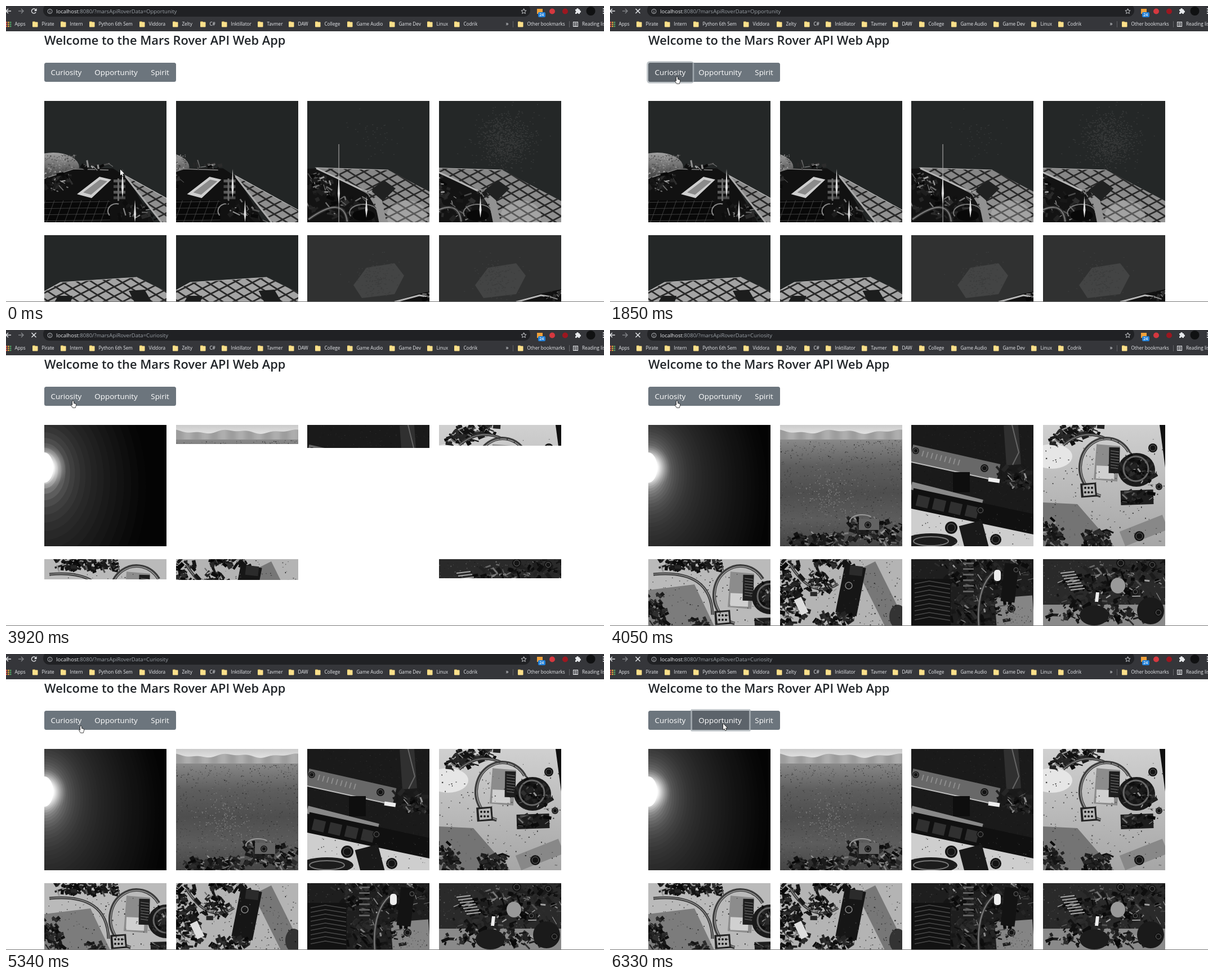
Write an HTML page with a canvas that moves like this. It is 1062 px wide and 527 px high and loops after 8000 ms.

```html
<!DOCTYPE html>
<html lang="en">
<head>
<meta charset="utf-8">
<title>Mars Rover API Web App</title>
<style>
html, body { margin: 0; width: 100%; height: 100%; overflow: hidden; background: #fff; }
canvas { display: block; width: 100vw; height: 100vh; }
</style>
</head>
<body>
<canvas id="stage" width="1062" height="527"></canvas>
<script>
const W = 1062, H = 527, LOOP = 8000, STEP = 120;
const FONT = '"Open Sans", "Noto Sans", sans-serif';
const LIGHT = '#e8eaed';
const stage = document.getElementById('stage').getContext('2d');
let c = stage;
let seed = 1;

const rnd = () => (seed = (seed * 16807) % 2147483647) / 2147483647;
const span = (a, b) => a + (b - a) * rnd();
const mix = (a, b, k) => a + (b - a) * k;
const grey = v => `rgb(${v | 0},${v | 0},${v | 0})`;
const times = (n, fn) => { for (let i = 0; i < n; i++) fn(i); };

function trace(pts) {
  c.beginPath();
  for (let i = 0; i < pts.length; i += 2) c.lineTo(pts[i], pts[i + 1]);
}
function poly(color, ...pts) { trace(pts); c.closePath(); c.fillStyle = color; c.fill(); }
function line(color, width, ...pts) { trace(pts); c.strokeStyle = color; c.lineWidth = width; c.stroke(); }
function rect(color, x, y, w, h) { c.fillStyle = color; c.fillRect(x, y, w, h); }
function oval(color, x, y, rx, ry = rx) {
  c.beginPath(); c.ellipse(x, y, rx, ry, 0, 0, 7); c.fillStyle = color; c.fill();
}
function ring(color, width, x, y, rx, ry = rx, from = 0, to = 6.3) {
  c.beginPath(); c.ellipse(x, y, rx, ry, 0, from, to);
  c.strokeStyle = color; c.lineWidth = width; c.stroke();
}
function pill(color, x, y, w, h, r) {
  c.beginPath(); c.roundRect(x, y, w, h, r); c.fillStyle = color; c.fill();
}
function text(s, x, y, size, color, weight = 400) {
  c.font = `${weight} ${size}px ${FONT}`;
  c.fillStyle = color;
  c.fillText(s, x, y);
}
function fade(y0, y1, ...stops) {
  const g = c.createLinearGradient(0, y0, 0, y1);
  stops.forEach((s, i) => g.addColorStop(i / (stops.length - 1), s));
  return g;
}

// ---- Photo textures

function specks(n, x, y, w, h, lo, hi, size = 1.6) {
  times(n, () => rect(grey(span(lo, hi)), x + rnd() * w, y + rnd() * h, span(.6, size), span(.6, size)));
}
function haze(n, x, y, spread, tone) {
  times(n, () => {
    const r = spread * Math.sqrt(-2 * Math.log(rnd())), a = rnd() * 6.283;
    rect(tone, x + r * Math.cos(a), y + r * Math.sin(a), 2, 1.4);
  });
}
// Dark machine parts strewn along a line, with a few lit edges
function swarm(n, x0, y0, x1, y1, spread, lit = .25) {
  times(n, () => {
    const k = rnd(), w = span(3, 15), h = span(2, 8), bright = rnd() < lit;
    c.save();
    c.translate(mix(x0, x1, k) + span(-spread, spread), mix(y0, y1, k) + span(-spread, spread));
    c.rotate(span(-1, 1.4));
    rect(grey(bright ? span(70, 165) : span(8, 48)), -w / 2, -h / 2, w, bright ? h * .4 : h);
    c.restore();
  });
}
function bolt(x, y, r) {
  oval('#141414', x, y, r);
  ring('#666', 1, x, y, r * .65);
}
function cable(x0, y0, cx, cy, x1, y1) {
  c.beginPath(); c.moveTo(x0, y0); c.quadraticCurveTo(cx, cy, x1, y1);
  c.strokeStyle = '#3c3c3c'; c.lineWidth = 5; c.stroke();
  c.strokeStyle = '#999'; c.lineWidth = 1.2; c.stroke();
}
function lattice(...pts) {
  c.save();
  trace(pts); c.closePath(); c.clip();
  rect(fade(285, 500, '#848484', '#a4a4a4'), 0, 160, W, H);
  for (const slope of [.65, -.5])
    for (let k = -900; k < 1400; k += 17) line('#2a2a2a', 2.8, 0, k, W, k + slope * W);
  c.restore();
  line('#bbb', 1.2, ...pts.slice(0, 6));
}
function spike(x, top, bottom) {
  const mid = mix(top, bottom, .65);
  poly('#ddd', x, top, x + 2, mid, x, bottom, x - 2, mid);
}

function photo(col, row, h, back, draw, dx = 0, dy = 0) {
  seed = 41 + col * 7 + row * 101;
  c.save();
  c.beginPath(); c.rect(Math.round(68 + 233.67 * col), row ? 408 : 169, 217, h); c.clip();
  c.fillStyle = back; c.fillRect(0, 0, W, H);
  c.translate(dx, dy);
  draw();
  c.restore();
}

// ---- First gallery

function deck() {
  oval(fade(260, 300, '#a4a4a4', '#4c4c4c'), 84, 287, 46, 26);
  specks(170, 68, 264, 55, 36, 60, 170, 3);
  poly('#111', 40, 316, 120, 289, 190, 289, 216, 306, 262, 385, 40, 385);
  line('#8a8a8a', 1.6, 50, 313, 120, 290, 182, 292);
  swarm(16, 140, 285, 188, 287, 4, .5);
  swarm(34, 72, 325, 110, 310, 13, .3);
  poly('#cfcfcf', 126, 335, 166, 304, 187, 309, 152, 342);
  poly('#8b8b8b', 137, 332, 167, 309, 180, 312, 151, 336);
  times(4, i => rect(grey(90 - 20 * (i % 2)), 191, 309 + i * 10, 21, 5));
  rect('#6a6a6a', 198, 307, 3, 40);
  rect('#080808', 40, 346, 145, 39);
  times(8, i => line('#4c4c4c', .8, 70 + i * 16, 346, 56 + i * 16, 385));
  times(4, i => line('#4c4c4c', .8, 40, 350 + i * 11, 185, 348 + i * 11));
  ring('#8b8b8b', 2, 196, 365, 15, 13, 2.5, 5);
  swarm(38, 205, 360, 255, 372, 14, .3);
  lattice(277, 385, 212, 302, 330, 367, 340, 385);
  line('#aaa', 3, 212, 303, 276, 385);
  spike(207, 290, 342);
  spike(229, 345, 385);
}

function mast() {
  poly('#131313', 500, 291, 553, 289, 650, 334, 668, 385, 500, 385);
  swarm(55, 540, 305, 570, 325, 14, .35);
  swarm(70, 550, 345, 640, 365, 22, .2);
  cable(537, 380, 600, 335, 606, 384);
  ring('#777', 2, 635, 368, 25, 15, 2.7, 6.3);
  oval('#080808', 635, 373, 20, 10);
  lattice(641, 333, 551, 288, 679, 292, 800, 356, 800, 385, 672, 385);
  oval('rgba(205,205,205,.3)', 712, 374, 36, 28);
  line('#b4b4b4', 3, 551, 289, 643, 332);
  line('#929292', 13, 660, 340, 670, 390);
  poly('#202121', 647, 328, 671, 310, 692, 325, 669, 347);
  swarm(9, 632, 327, 648, 333, 3, .8);
  spike(640, 338, 377);
}

function roof() {
  lattice(20, 535, 97, 492, 233, 483, 310, 521, 310, 540);
  poly('#1c1d1d', 93, 516, 118, 516, 115, 527, 86, 527);
  poly('#1c1d1d', 218, 507, 246, 505, 259, 527, 228, 527);
}

function glare() {
  poly('#434444', 617, 497, 640, 466, 690, 458, 707, 480, 690, 513, 632, 520);
  haze(160, 655, 485, 17, '#3c3d3d');
  poly('#111', 686, 527, 730, 513, 790, 500, 790, 527);
  line('#b5b5b5', 3, 690, 527, 734, 515, 752, 518);
  swarm(18, 745, 520, 775, 514, 6, .4);
}

function firstGallery() {
  const sky = '#242727';
  photo(0, 0, 216, sky, deck);
  photo(1, 0, 216, '#222525', deck, 195.5);
  photo(2, 0, 216, sky, () => {
    haze(50, 650, 228, 23, '#353838');
    mast();
    rect('#a4a4a4', 590.5, 246, 1.2, 139);
    spike(591, 300, 352);
  });
  photo(3, 0, 216, sky, () => { haze(900, 684, 239, 23, '#383a3a'); mast(); }, 202.5);
  photo(0, 1, 118, sky, roof);
  photo(1, 1, 118, '#222525', roof, 230.5);
  photo(2, 1, 118, '#303131', glare);
  photo(3, 1, 118, '#303131', glare, 216);
}

// ---- Second gallery

function sun(bands, reach) {
  times(bands, i => {
    const k = i / bands, r = reach * Math.pow(1 - k, 1.4) + 16;
    oval(grey(6 + 70 * k + 170 * Math.pow(k, 6)), 68, 245 + r * .19, r, r * 1.35);
  });
  const g = c.createRadialGradient(68, 245, 16, 68, 245, 40);
  g.addColorStop(0, '#fff'); g.addColorStop(1, 'rgba(150,150,150,0)');
  oval(g, 68, 245, 40);
  oval('#fff', 68, 245, 16, 27);
}

function horizon() {
  rect(fade(169, 184, '#cacaca', '#e0e0e0'), 301, 169, 218, 20);
  for (let x = 301; x < 519; x++) {
    const ridge = 181 + 2.5 * Math.sin(x / 17) + 1.5 * Math.sin(x / 7);
    rect(grey(166 + 9 * Math.sin(x / 5)), x, ridge, 1.2, 22);
  }
  rect(fade(194, 385, '#8a8a8a', '#5e5e5e', '#4e4e4e', '#5c5c5c', '#444'), 301, 195, 218, 190);
  specks(1100, 301, 196, 218, 189, 45, 112, 2);
  haze(160, 388, 292, 25, '#787878');
  swarm(150, 325, 378, 415, 374, 12, .28);
  swarm(150, 435, 352, 510, 365, 20, .28);
  line('#636363', 20, 442, 346, 478, 346);
  ring('#999', 2, 448, 341, 22, 12, 3, 5.5);
  bolt(458, 347, 6);
}

function arm() {
  specks(650, 535, 169, 217, 166, 18, 52);
  line('#303030', 26, 712, 169, 717, 240);
  line('#666', 2, 714, 169, 726, 218, 715, 240);
  line('#686868', 31, 535, 219, 690, 254);
  times(9, i => line('#8e8e8e', 2, 557 + i * 8, 215 + i * 2, 554 + i * 8, 225 + i * 2));
  line('#bdbdbd', 2, 535, 235, 686, 268);
  bolt(543, 215, 6); bolt(665, 246, 7);
  swarm(70, 700, 262, 745, 270, 19, .12);
  line('#eee', 7, 672, 266, 692, 269);
  rect('#0e0e0e', 609, 253, 30, 36);
  line('#888', 14, 535, 277, 661, 309);
  line('#101010', 40, 535, 301, 752, 348);
  times(4, i => line('#303030', 20, 545 + i * 29, 303 + i * 6, 566 + i * 29, 308 + i * 6));
  poly('#cecece', 535, 318, 752, 364, 752, 385, 535, 385);
  line('#191919', 42, 640, 344, 652, 390);
  oval('#1c1c1c', 570, 376, 47, 14);
  ring('#777', 2, 570, 376, 31, 8);
  bolt(606, 352, 11); bolt(685, 373, 10); bolt(658, 321, 7);
  specks(55, 542, 324, 206, 58, 25, 90, 2);
}

// Cable loop, sensor frame and hub seen from two viewpoints
function instruments() {
  ring('#3c3c3c', 6, 882, 245, 47, 52, 1.8, 5.7);
  ring('#999', 1.5, 882, 245, 46, 51, 1.8, 5.7);
  line('#8c8c8c', 42, 885, 205, 880, 268);
  line('#d0d0d0', 32, 880, 242, 879, 265);
  line('#1e1e1e', 19, 896, 209, 895, 255);
  times(7, i => line('#777', 1, 889, 215 + i * 5, 904, 217 + i * 5));
  oval('#1a1a1a', 935, 249, 33, 30);
  swarm(60, 920, 240, 960, 262, 18, .2);
  ring('#666', 3, 934, 247, 22);
  line('#1e1e1e', 26, 907, 299, 965, 297);
  swarm(28, 913, 299, 960, 297, 10, .3);
  line('#222', 25, 836, 286, 864, 284);
  line('#b4b4b4', 19, 840, 286, 861, 284);
  times(6, i => oval('#111', 844 + (i % 3) * 6, 281 + (i / 3 | 0) * 8, 1.9));
}

function mainDeck() {
  oval('#e6e6e6', 785, 225, 36, 22);
  poly('#747474', 769, 307, 830, 310, 895, 385, 769, 385);
  line('#888', 28, 910, 372, 986, 342);
  swarm(110, 795, 193, 862, 174, 14, .25);
  cable(805, 205, 840, 175, 880, 193);
  instruments();
  swarm(80, 778, 350, 795, 382, 16, .08);
  swarm(80, 850, 374, 878, 372, 15, .08);
  poly('#101010', 976, 169, 986, 169, 986, 245);
  bolt(964, 210, 8); bolt(975, 279, 6); bolt(940, 367, 9);
  specks(170, 769, 190, 217, 192, 15, 100, 2.4);
}

function sideDeck() {
  poly('#7c7c7c', 718, 236, 800, 226, 835, 300, 718, 300);
  swarm(120, 745, 190, 845, 190, 12, .25);
  cable(727, 208, 830, 198, 832, 280);
  instruments();
  swarm(80, 726, 255, 742, 295, 15, .08);
  swarm(30, 800, 295, 825, 296, 9, .1);
  specks(120, 718, 207, 217, 92, 15, 100, 2.4);
}

function boxDeck() {
  line('#777', 36, 455, 420, 512, 535);
  swarm(190, 308, 415, 328, 525, 24, .2);
  line('#ddd', 14, 333, 478, 346, 505);
  cable(320, 418, 360, 482, 405, 452);
  swarm(60, 350, 440, 392, 460, 18, .35);
  swarm(50, 370, 412, 430, 413, 8, .35);
  line('#161616', 38, 436, 420, 419, 506);
  line('#2b2b2b', 23, 438, 420, 436, 437);
  ring('#888', 1.5, 424, 455, 6);
  swarm(60, 372, 517, 425, 517, 12, .12);
  oval('#333', 511, 510, 15, 21);
  specks(140, 360, 409, 158, 117, 15, 100, 2.4);
}

function driveDeck() {
  specks(300, 535, 408, 217, 119, 15, 80, 2);
  line('#858585', 55, 685, 505, 752, 500);
  swarm(210, 590, 430, 735, 440, 28, .2);
  swarm(130, 615, 500, 690, 495, 25, .15);
  rect('#121212', 535, 443, 70, 84);
  times(9, i => line('#484848', 1.4, 541, 452 + i * 8, 567, 447 + i * 8, 604, 453 + i * 8));
  times(6, i => rect('#606060', 627, 414 + i * 10, 19, 3));
  cable(655, 527, 650, 460, 681, 431);
  pill('#eee', 682, 427, 12, 20, 5);
  line('#131313', 25, 714, 416, 706, 484);
  bolt(721, 427, 6); bolt(713, 496, 7);
  specks(60, 686, 487, 64, 39, 20, 150, 2.2);
}

function wheelDeck() {
  specks(390, 769, 408, 217, 119, 25, 120, 2);
  rect('#8a8a8a', 769, 489, 217, 38);
  swarm(260, 812, 465, 975, 440, 33, .22);
  swarm(120, 790, 505, 970, 505, 15, .15);
  times(7, i => line('#aaa', 1.8, 800 + i * 3, 433 + i * 5, 825 + i * 3, 430 + i * 5));
  oval('#1c1c1c', 860, 508, 26, 18);
  oval('#1a1a1a', 960, 500, 24, 24);
  oval('#999', 902, 455, 13, 14);
  bolt(907, 415, 8); bolt(963, 418, 7); bolt(933, 466, 6); bolt(974, 503, 7);
  line('#eee', 6, 866, 467, 864, 484);
}

function secondGallery(loaded) {
  const h = part => loaded ? 216 : part, low = part => loaded ? 118 : part;
  const floor = fade(169, 385, '#d0d0d0', '#a6a6a6');
  photo(0, 0, 216, '#040404', () => sun(loaded ? 38 : 17, loaded ? 195 : 165));
  photo(1, 0, h(34), '#666', horizon);
  photo(2, 0, h(41), '#1a1a1a', arm);
  photo(3, 0, h(37), floor, mainDeck);
  photo(0, 1, low(36), '#bababa', sideDeck, -650, 227);
  photo(1, 1, low(37), '#b4b4b4', boxDeck);
  if (loaded) photo(2, 1, 118, '#1e1e1e', driveDeck);
  photo(3, 1, low(34), '#2a2a2a', wheelDeck);
}

function prerender(draw) {
  const layer = document.createElement('canvas');
  layer.width = W; layer.height = H;
  c = layer.getContext('2d');
  draw();
  c = stage;
  return layer;
}

// ---- Browser window

const bookmarks = {
  Pirate: 47, Intern: 97, 'Python 6th Sem': 148, Viddora: 237, Zelty: 296, 'C#': 345,
  Inktillator: 383, Tavmer: 447, DAW: 502, College: 549, 'Game Audio': 606,
  'Game Dev': 681, Linux: 748, Codrik: 796, 'Other bookmarks': 909
};

function bookmark(name, x) {
  pill('#e8c35f', x, 27.5, 5, 4, 1);
  pill('#fce08b', x, 28.5, 9.5, 9, 1);
  text(name, x + 16.4, 35.2, 8.2, LIGHT);
}

function star(x, y, r) {
  const pts = [];
  times(12, i => {
    const a = i * Math.PI / 5 - Math.PI / 2, d = i % 2 ? r * .46 : r;
    pts.push(x + d * Math.cos(a), y + d * Math.sin(a));
  });
  line('#c8cacd', 1, ...pts);
}

function arrow(color, tip, tail) {
  const back = tip + Math.sign(tail - tip) * 4;
  line(color, 1.4, tail, 9, tip, 9);
  line(color, 1.4, back, 5, tip, 9, back, 13);
}

function toolbar() {
  rect('#35363a', 0, 0, W, 45);
  pill('#202124', 66, -4, 865, 23, 11);
  arrow(LIGHT, 0, 9);
  arrow('#85878b', 31, 22);
  ring('#b5b8bc', 1, 78, 9.5, 4);
  rect('#b5b8bc', 77.5, 9, 1, 3); rect('#b5b8bc', 77.5, 7, 1, 1);
  star(919.5, 9.6, 4.8);
  rect('#f0a13a', 943, 5, 10, 9);
  pill('#2381d8', 945, 11, 13, 9, 2);
  text('24', 947.3, 18, 7, '#fff', 600);
  oval('#d5383f', 970, 9.5, 5);
  oval('#9c1720', 993, 9.5, 5);
  rect(LIGHT, 1011, 6, 8, 8);
  oval(LIGHT, 1015, 6, 2); oval(LIGHT, 1019, 10, 2);
  oval('#35363a', 1011, 10, 1.4); oval('#35363a', 1015, 14, 1.4);
  oval('#101112', 1038.5, 9, 8);
  times(3, i => oval(LIGHT, 1061, 5 + i * 4, 1.1));
}

function bookmarkBar() {
  const dots = ['#e85b4b', '#f4bd42', '#57a866', '#528de8'];
  times(9, i => rect(dots[(i + (i / 3 | 0)) % 4], (i % 3) * 3.5, 28 + (i / 3 | 0) * 3.5, 2.3, 2.3));
  text('Apps', 15.5, 35.2, 8.2, LIGHT);
  for (const name in bookmarks) bookmark(name, bookmarks[name]);
  text('»', 887.5, 35.3, 10, LIGHT);
  rect('#626367', 900, 27, 1, 11); rect('#626367', 1000, 27, 1, 11);
  c.strokeStyle = LIGHT; c.lineWidth = 1; c.strokeRect(1007.5, 28.5, 8, 8);
  times(3, i => rect(LIGHT, 1009, 30 + i * 2.3, 5, 1));
  text('Reading list', 1023, 35.2, 8.2, LIGHT);
}

const page = prerender(() => {
  toolbar();
  bookmarkBar();
  text('Welcome to the Mars Rover API Web App', 68, 68.5, 21.8, '#212529', 600);
  rect('#777', 0, 526, W, 1);
});
const before = prerender(firstGallery);
const arriving = prerender(() => secondGallery(false));
const after = prerender(() => secondGallery(true));

function reloadIcon(loading) {
  if (loading) {
    line(LIGHT, 1.4, 45.5, 5, 53.5, 13);
    line(LIGHT, 1.4, 53.5, 5, 45.5, 13);
  } else {
    ring(LIGHT, 1.4, 49.5, 9, 4, 4, .5, 5.6);
    poly(LIGHT, 54.5, 4, 54.5, 9, 49.8, 9);
  }
}

function address(name) {
  const host = 'localhost';
  text(host, 89, 13, 9.5, LIGHT);
  const x = 89 + c.measureText(host).width;
  text(':8080/?marsApiRoverData=' + name, x, 13, 9.5, '#9aa0a6');
}

function focusBox(x, w, left) {
  const r = [left, 0, 0, left];
  c.beginPath();
  c.roundRect(x - 2.8, 98.2, w + 5.6, 39.6, left + 2);
  c.roundRect(x, 101, w, 34, r);
  c.fillStyle = 'rgba(173,180,186,.8)';
  c.fill('evenodd');
  pill('#5c636a', x, 101, w, 34, r);
}

function buttons(focus) {
  pill('#6c757d', 68, 101, 234, 34, 3.5);
  if (focus === 'Curiosity') focusBox(68, 78.5, 3.5);
  if (focus === 'Opportunity') focusBox(146, 101, 0);
  text('Curiosity', 79.5, 123.3, 13.4, '#fff');
  text('Opportunity', 157.3, 123.3, 13.4, '#fff');
  text('Spirit', 257.3, 123.3, 13.4, '#fff');
}

// ---- Pointer: each leg eases to a point in a few equal steps

const legs = [
  { at: 370, steps: 3, x: 148, y: 198 },
  { at: 750, steps: 4, x: 118, y: 116 },
  { at: 1230, steps: 2, x: 119, y: 126 },
  { at: 4600, steps: 4, x: 190, y: 192 },
  { at: 5100, steps: 3, x: 133, y: 128 },
  { at: 5460, steps: 2, x: 343, y: 113 },
  { at: 5700, steps: 2, x: 199, y: 126 },
  { at: 5940, steps: 1, x: 201, y: 124 }
];
const easeOut = k => 1 - (1 - k) * (1 - k);

function pointerAt(t) {
  let x = 203, y = 291;
  for (const leg of legs) {
    if (t < leg.at) break;
    const k = easeOut(Math.min(1, (Math.floor((t - leg.at) / STEP) + 1) / leg.steps));
    x = mix(x, leg.x, k);
    y = mix(y, leg.y, k);
  }
  return [Math.round(x), Math.round(y)];
}

const HAND = [-1, 1, 0, 0, 1, 1, 1, 4.5, 4.5, 5.5, 5.5, 7, 4, 12, -.5, 12, -3, 7.8, -2.5, 6.8, -1, 8];
const ARROW = [0, 0, 0, 10.5, 2.3, 8.4, 3.9, 12, 5.5, 11.2, 4, 7.8, 7.2, 7.6];

function pointer(t) {
  const [x, y] = pointerAt(t);
  const overButton = x > 68 && x < 302 && y > 101 && y < 135;
  c.save();
  c.translate(x, y);
  c.lineJoin = 'round';
  trace(overButton && t < 5940 ? HAND : ARROW);
  c.closePath();
  c.strokeStyle = '#111'; c.lineWidth = 1.4; c.stroke();
  c.fillStyle = '#fff'; c.fill();
  c.restore();
}

function render(t) {
  rect('#fff', 0, 0, W, H);
  c.drawImage(t < 3920 ? before : t < 4050 ? arriving : after, 0, 0);
  c.drawImage(page, 0, 0);
  reloadIcon((t >= 1850 && t < 4200) || t >= 6210);
  address(t < 3800 ? 'Opportunity' : 'Curiosity');
  buttons(t >= 1850 && t < 3920 ? 'Curiosity' : t >= 6210 ? 'Opportunity' : '');
  pointer(t);
}

const start = performance.now();
function tick() {
  render((performance.now() - start) % LOOP);
  requestAnimationFrame(tick);
}
tick();
</script>
</body>
</html>
```
